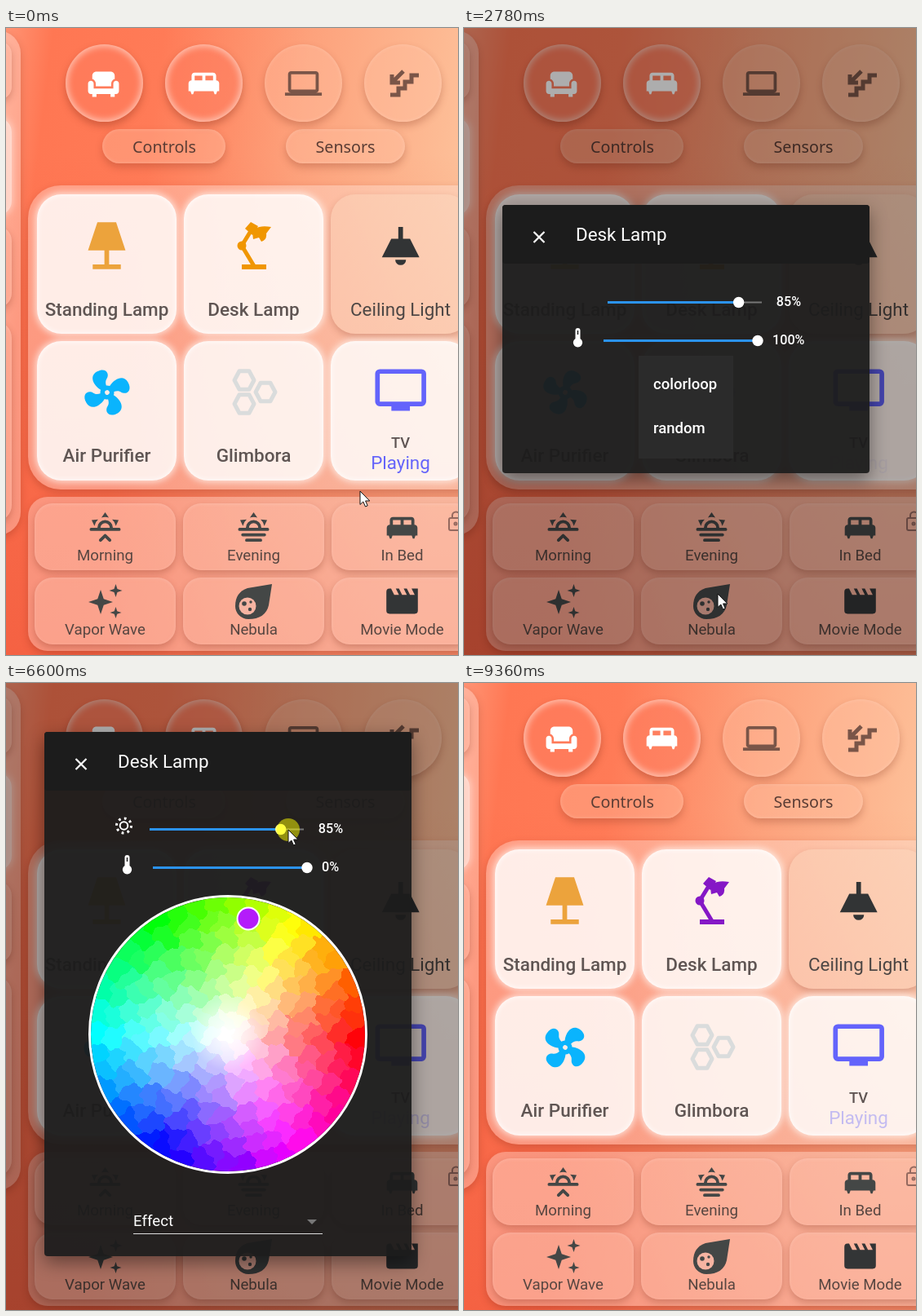
Write an HTML page with a canvas that moves like this. It is 554 px wide and 769 px high and loops after 9410 ms.

```html
<!DOCTYPE html>
<html lang="en">
<head>
<meta charset="utf-8">
<title>Light control dashboard</title>
<style>
html, body { margin: 0; width: 100%; height: 100%; overflow: hidden; }
#stage { position: relative; width: 554px; height: 769px; overflow: hidden;
  background: linear-gradient(transparent 20%, rgba(232,70,45,.45)),
    linear-gradient(97deg, #ff9474 0, #ff7753 9%, #ff7b57 30%, #fda27c 58%, #fdc29b 92%); }
#stage div, #stage svg, #stage canvas { position: absolute; box-sizing: border-box; }
.full { left: 0; top: 0; width: 554px; height: 769px; }
svg { overflow: visible; }
text { font-family: Roboto, sans-serif; }
.panel { background: rgba(255,235,228,.34); box-shadow: 0 4px 10px rgba(130,40,20,.28); }
.on { background: rgba(255,252,250,.85); box-shadow: 0 0 9px 2px rgba(255,248,244,.75), inset 0 0 7px #fff; }
.off { background: rgba(250,215,190,.4); box-shadow: 0 4px 8px rgba(130,50,30,.25); }
.scene { background: rgba(255,190,170,.35); box-shadow: 0 4px 8px rgba(130,50,30,.3), inset 0 1px 4px rgba(255,225,215,.25); }
.lit { background: rgba(255,125,95,.6); box-shadow: 0 5px 10px rgba(130,40,20,.35), inset 0 0 9px 2px rgba(255,225,215,.75); }
.dim { background: rgba(255,195,165,.35); box-shadow: 0 5px 10px rgba(130,50,30,.28), inset 0 0 5px rgba(255,230,215,.3); }
#scrim { background: rgba(0,0,0,.32); }
#popup, #dialog { transform-origin: 272px 381px; }
#wheel, #mini { border-radius: 50%; }
#wheel { left: 101px; top: 260px; width: 342px; height: 342px; border: 3px solid #fff; }
#mini { left: 280px; top: 637px; width: 72px; height: 72px; }
#cross { mix-blend-mode: difference; }
</style>
</head>
<body>
<div id="stage"></div>
<script>
const stage = document.getElementById('stage');
const $ = id => document.getElementById(id);

const box = (cls, x, y, w, h, r, css = '') =>
  `<div class="${cls}" style="left:${x}px;top:${y}px;width:${w}px;height:${h}px;border-radius:${r}px;${css}"></div>`;
const svg = (body, attrs = '') => `<svg class="full" viewBox="0 0 554 769" ${attrs}>${body}</svg>`;
const text = (x, y, s, size, fill, weight = 400, more = 'text-anchor="middle"') =>
  `<text x="${x}" y="${y}" font-size="${size}" fill="${fill}" font-weight="${weight}" ${more}>${s}</text>`;
// Icons live on a 24-unit grid and are centred on (x, y).
const icon = (x, y, k, fill, d, id = '') =>
  `<g transform="translate(${x} ${y}) scale(${k})"><g id="${id}"><path transform="translate(-12 -12)" fill="${fill}" fill-rule="evenodd" d="${d}"/></g></g>`;

const SUN = 'M3 12H7A5 5 0 0 1 17 12H21A1 1 0 0 1 21 14H3A1 1 0 0 1 3 12M15 12A3 3 0 0 0 9 12ZM12 2L14.4 5.4Q12 4.6 9.6 5.4ZM3.3 7L7.5 6.6Q5.6 8.2 5.1 10.8ZM20.7 7L18.9 10.8Q18.4 8.2 16.5 6.6Z';
const D = {
  bed: 'M20 10V7c0-1.1-.9-2-2-2H6C4.9 5 4 5.9 4 7v3c-1.1 0-2 .9-2 2v5h1.3L4 19h1l.7-2h12.6l.7 2h1l.7-2H22v-5c0-1.1-.9-2-2-2zm-9 0H6V7h5zm7 0h-5V7h5z',
  chair: 'M21 9.5c-1.1 0-2 .9-2 2V15H5v-3.500c0-1.100-.9-2-2-2s-2 .9-2 2V17c0 1.100.9 2 2 2h1v2h3v-2h10v2h3v-2h1c1.100 0 2-.9 2-2v-5.500c0-1.100-.9-2-2-2zM17 3H7C5.300 3 4 4.300 4 6v2.200c1.500.5 2.500 1.700 2.500 3.300V13.500h11v-2c0-1.600 1-2.800 2.500-3.300V6c0-1.700-1.300-3-3-3z',
  laptop: 'M4 6H20V16H4M20 18A2 2 0 0 0 22 16V6C22 4.900 21.100 4 20 4H4C2.900 4 2 4.900 2 6V16A2 2 0 0 0 4 18H0V20H24V18Z',
  lamp: 'M8 2H16L20 14H4ZM11 14H13V20H18V22H6V20H11Z',
  ceiling: 'M8 9H11V4H13V9H16L20 17H4ZM14.300 18A2.300 2.300 0 0 1 9.700 18Z',
  tv: 'M21 17H3V5H21M21 3H3A2 2 0 0 0 1 5V17A2 2 0 0 0 3 19H8V21H16V19H21A2 2 0 0 0 23 17V5A2 2 0 0 0 21 3Z',
  fan: 'M12 11A1 1 0 0 0 12 13A1 1 0 0 0 12 11M12.500 2C17 2 17.110 5.570 14.750 6.750C13.760 7.240 13.320 8.290 13.130 9.220C13.610 9.420 14.030 9.730 14.350 10.130C18.050 8.130 22.030 8.920 22.030 12.500C22.030 17 18.460 17.100 17.280 14.730C16.780 13.740 15.720 13.300 14.790 13.110C14.590 13.590 14.280 14 13.880 14.340C15.870 18.030 15.080 22 11.500 22C7 22 6.910 18.420 9.270 17.240C10.250 16.750 10.690 15.710 10.890 14.790C10.400 14.590 9.970 14.270 9.650 13.870C5.960 15.850 2 15.070 2 11.500C2 7 5.560 6.890 6.740 9.260C7.240 10.250 8.290 10.680 9.220 10.870C9.410 10.390 9.730 9.970 10.140 9.650C8.150 5.960 8.940 2 12.500 2Z',
  morning: SUN + 'M12.700 16.300L15.800 19.400A1 1 0 0 1 14.400 20.800L12 18.400L9.600 20.800A1 1 0 0 1 8.200 19.400L11.300 16.300Q12 15.700 12.700 16.300Z',
  evening: SUN + 'M5 15.500H19A1 1 0 0 1 19 17.500H5A1 1 0 0 1 5 15.500M7.500 19H16.500A1 1 0 0 1 16.500 21H7.500A1 1 0 0 1 7.500 19Z',
  movie: 'M18 4L20 8H17L15 4H13L15 8H12L10 4H8L10 8H7L5 4H4A2 2 0 0 0 2 6V18A2 2 0 0 0 4 20H20A2 2 0 0 0 22 18V4Z'
};
const hex = (x, y) => {
  const p = [0, 1, 2, 3, 4, 5].map(i => [x + 12 * Math.cos(i * Math.PI / 3), y + 13 * Math.sin(i * Math.PI / 3)]);
  return `<polygon points="${p}" fill="none" stroke="#dadcdc" stroke-width="5" stroke-linejoin="round"/>`;
};
const star = (x, y, r) => {
  const q = r * .25;
  return `<path fill="#444746" d="M${x} ${y - r}l${q} ${r - q} ${r - q} ${q} ${q - r} ${q} ${-q} ${r - q} ${-q} ${q - r} ${q - r} ${-q} ${r - q} ${-q}z"/>`;
};

const cols = [0, 1, 2];
const boxes =
  box('panel', -60, 3, 78, 619, 28) +
  box('scene', -60, 16, 67, 72, 16) + box('on', -60, 110, 67, 120, 18, 'opacity:.6') +
  box('scene', -60, 243, 67, 100, 18) + box('scene', -60, 360, 67, 245, 20) +
  [0, 1, 2, 3].map(i => box(i < 2 ? 'lit' : 'dim', 72.5 + i * 122.3, 20, 95, 95, 48)).join('') +
  box('dim', 118, 124, 151, 42, 21) + box('dim', 343, 124, 146, 42, 21) +
  box('panel', 27, 193, 600, 373, 40) + box('panel', 27, 575, 600, 189, 24) +
  [204, 384].map(y => cols.map(i => box(y < 300 && i > 1 ? 'off' : 'on', 38 + i * 180, y, 171, 171, 30)).join('')).join('') +
  [583, 674].map(y => cols.map(i => box('scene', 35 + i * 182, y, 173, 82, 22)).join('')).join('');

const INK = '#5f5553', DARK = '#444746', NOTO = 'text-anchor="middle" style="font-family:\'Noto Sans\',sans-serif"';
const home = svg(
  icon(119.500, 69, 1.720, '#fff', D.chair) + icon(242.500, 68, 1.880, '#fff', D.bed) +
  icon(364.500, 68, 1.880, '#7a5548', D.laptop) +
  `<path d="M471 82H481V74H489V66H497V58H506M487 53L474 66M473 57V67H483" fill="none" stroke="#7a5548" stroke-width="5"/>` +
  text(194, 153, 'Controls', 19.700, '#5a3d35', 400, NOTO) + text(416, 153, 'Sensors', 19.700, '#5a3d35', 400, NOTO) +
  icon(123.500, 267, 2.870, '#eca33c', D.lamp) + icon(483.700, 267, 2.870, '#323435', D.ceiling) +
  `<g id="desk"><path d="M289 290H319V296H289ZM293 246L300 238L309 243L302 254ZM303 259Q299 240 325 244L319 252Q320 260 313 262L310 257Z"/>
   <circle cx="289" cy="267" r="5.500"/><path d="M300 249L289 267L304 292" fill="none" stroke="currentColor" stroke-width="5"/></g>` +
  icon(124, 447, 2.840, '#0ab4fd', D.fan, 'fan') + hex(292, 432) + hex(318, 446.500) + hex(292, 461) +
  icon(483.700, 444, 2.840, '#6363fb', D.tv) +
  text(123.500, 353, 'Standing Lamp', 22.500, INK, 500) + text(303.500, 353, 'Desk Lamp', 22.500, INK, 500) +
  text(483.500, 353, 'Ceiling Light', 22.400, '#4c4644') +
  text(123.500, 532, 'Air Purifier', 22.500, INK, 500) + text(303.500, 532, 'Glimbora', 22.500, INK, 500) +
  text(483.500, 515, 'TV', 18.300, INK, 500) + text(483.500, 541, 'Playing', 22.400, '#6363fb', 400, 'text-anchor="middle" id="playing"') +
  icon(121.500, 613, 1.900, DARK, D.morning) + icon(303.500, 613, 1.900, DARK, D.evening) + icon(485.500, 613, 1.880, DARK, D.bed) +
  star(116, 704, 15) + star(134.500, 690, 8) + star(134.500, 717, 7) +
  `<path fill="${DARK}" d="M326 682L322 708Q318 725 297 725A16 16 0 0 1 281 709Q281 692 296 687Z"/><circle cx="296" cy="709" r="10.500" fill="#f6b4a2"/>
   <g fill="${DARK}"><circle cx="292" cy="706" r="2.800"/><circle cx="300" cy="704" r="1.700"/><circle cx="299" cy="713" r="2.200"/></g>` +
  icon(485.500, 703, 1.930, '#333536', D.movie) +
  ['Morning', 'Evening', 'In Bed', 'Vapor Wave', 'Nebula', 'Movie Mode'].map((s, i) =>
    text(121.500 + i % 3 * 182, i < 3 ? 653 : 744, s, 18.700, '#574641')).join('') +
  `<g fill="none" stroke="#94695f" stroke-width="2"><rect x="543" y="601" width="16" height="15" rx="2"/><path d="M547 601V598a4.500 4.500 0 0 1 9 0"/><circle cx="551" cy="608" r="1.500"/></g>`);

const popup = `<div id="popup" class="full">` + box('', 61, 19, 422, 725, 4, 'background:rgba(28,28,28,.93)') +
  svg(text(272, 101, '85%', 21.600, '#fff') +
    `<path d="M204 132H341V496a19 19 0 0 1-19 19H223a19 19 0 0 1-19-19Z" fill="#000" opacity=".08"/>
     <path d="M204 190H341V496a19 19 0 0 1-19 19H223a19 19 0 0 1-19-19Z" fill="#f9dc64"/>
     <rect x="251" y="200" width="43" height="6" rx="2" fill="#fff" opacity=".8"/>
     <circle cx="228" cy="585" r="36" fill="#efe6e6"/><circle cx="316" cy="585" r="36" fill="#ebbd92"/><circle cx="228" cy="673" r="36" fill="#e6a05c"/>`) +
  `<canvas id="mini" width="72" height="72"></canvas></div>`;

const WHITE = '#fff', START = '';
const slider = (x, y, id) =>
  `<path d="M${x} ${y}h189" stroke="#777" stroke-width="2"/><path id="${id}Line" d="M${x} ${y}h189" stroke="#2b93f0" stroke-width="2.800"/><circle id="${id}Knob" cx="${x + 189}" cy="${y}" r="6.700" fill="#fff"/>`;
const dialog = `<div id="dialog" class="full"><div id="sheet" style="left:47px;top:60px;width:450px;border-radius:4px;background:rgba(28,28,28,.94);box-shadow:0 8px 22px rgba(0,0,0,.42)"></div>` +
  box('', 47, 60, 450, 72, 4, 'background:#1c1c1c') +
  `<canvas id="wheel" width="336" height="336"></canvas>` +
  svg(`<circle id="hover" cx="92" cy="96" r="27" fill="#fff" opacity=".07"/><path d="M85.500 93l13 13m0-13l-13 13" stroke="#fff" stroke-width="2.200"/>` +
    text(137, 104, 'Desk Lamp', 22.400, WHITE, 400, START) +
    `<g id="sun" fill="none" stroke="#fff"><circle cx="144.500" cy="175" r="4.800" stroke-width="2"/><circle cx="144.500" cy="175" r="9" stroke-width="3" stroke-dasharray="2.800 4.270"/></g>` +
    slider(176, 179.500, 'bri') + text(398, 184, '', 16.200, WHITE, 500, 'text-anchor="middle" id="briText"') +
    `<g id="temp"><path d="M136.500 224V214a3 3 0 0 1 6 0V224a5.700 5.700 0 1 1-6 0Z" fill="#fff"/><path d="M139.500 214v5" stroke="#1c1c1c" stroke-width="1.500"/>` +
    slider(171, 226.500, 'temp') + text(378, 231, '', 16.200, WHITE, 500, 'id="tempText"') + `</g>` +
    `<g id="full"><circle id="mark" stroke-width="2"/>` + text(156, 666, 'Effect', 18.700, WHITE, 400, START) +
    `<path d="M156 675.500H388" stroke="#ddd"/><path d="M369 658h12l-6 6z" fill="#777"/></g>
     <g id="menu"><rect x="214" y="245" width="116" height="126" fill="#2b2b2b"/>` +
    text(232, 286, 'colorloop', 18.500, WHITE, 500, START) + text(232, 340, 'random', 18.500, WHITE, 500, START) + `</g>`) + `</div>`;

const pointer =
  svg(`<circle r="14" id="press" fill="#ff0" opacity=".5"/>`) +
  svg(`<path id="crossPath" d="M-12 0H12M0-12V12" stroke="#fff" stroke-width="2"/>`, 'id="cross"') +
  svg(`<path id="arrow" d="M0 0V16.500L3.800 13L6.500 19L9.200 17.800L6.600 12H11.800Z" fill="#fff" stroke="#111"/>
    <path id="hand" d="M-2-5q0-2 2-2t2 2V2l6 1.500q2 .5 2 3L9 15H0L-6 7q-1-2 1-2.500L-2 7Z" fill="#fff" stroke="#111"/>`);

stage.innerHTML = boxes + home + '<div id="scrim" class="full"></div>' + popup + dialog + pointer;

// Colour wheel: jittered ring cells with wavy borders.
function drawWheel() {
  const n = 336, c = n / 2, ctx = $('wheel').getContext('2d'), img = ctx.createImageData(n, n);
  let seed = 7;
  const rnd = () => (seed = seed * 16807 % 2147483647) / 2147483647 - .5;
  const cells = [{ x: 0, y: 0, rgb: [255, 255, 255] }];
  for (let k = 1; k <= 8; k++) {
    const count = Math.round(4 + 4.500 * k);
    for (let i = 0; i < count; i++) {
      const a = (i + k * .4 + rnd() * .7) / count * 2 * Math.PI, r = k * 20 + rnd() * 12;
      const s = Math.min(1, r / 162);
      const rgb = [0, 8, 4].map(o => {
        const h = (o + a * 6 / Math.PI) % 12;
        const pure = Math.max(0, Math.min(1, .5 - Math.max(-1, Math.min(h - 3, 9 - h, 1)) ));
        return 255 * (1 - s + s * Math.min(1, pure * 1));
      });
      // Full-saturation hue as a clipped triangle wave.
      const h6 = a * 3 / Math.PI;
      [0, 4, 2].forEach((o, j) => {
        const d = Math.abs(((h6 - o) % 6 + 9) % 6 - 3);
        rgb[j] = 255 * (1 - s + s * Math.max(0, Math.min(1, 2 - d)));
      });
      cells.push({ x: r * Math.cos(a), y: r * Math.sin(a), rgb });
    }
  }
  for (let y = 0; y < n; y++) for (let x = 0; x < n; x++) {
    const px = x - c + 3 * Math.sin(y * .19) + 1.500 * Math.sin(y * .5 + x * .1);
    const py = y - c + 3 * Math.sin(x * .17) + 1.500 * Math.sin(x * .46 - y * .1);
    let best = 1e9, hit;
    for (const s of cells) {
      const d = (s.x - px) ** 2 + (s.y - py) ** 2;
      if (d < best) { best = d; hit = s; }
    }
    img.data.set([...hit.rgb, 255], (y * n + x) * 4);
  }
  ctx.putImageData(img, 0, 0);
  const glow = ctx.createRadialGradient(c, c, 0, c, c, 45);
  glow.addColorStop(0, '#fff');
  glow.addColorStop(1, 'rgba(255,255,255,0)');
  ctx.fillStyle = glow;
  ctx.fillRect(0, 0, n, n);
  $('mini').getContext('2d').drawImage($('wheel'), 0, 0, 72, 72);
}
drawWheel();

const LOOP = 9410;
const path = [[0, 434, 568], [850, 303, 300], [1000, 302, 299], [1850, 302, 299], [2450, 311, 694], [3300, 311, 694],
  [3650, 312, 460], [4020, 327, 322], [4400, 322, 240], [4800, 211, 385], [5200, 297, 289], [5700, 297, 289],
  [6450, 346, 180], [6640, 346, 180], [7100, 287, 181], [7250, 287, 181], [7810, 90, 92], [8150, 90, 92],
  [8700, 138, 190], [9250, 532, 775], [LOOP, 532, 775]];
const presses = [[1000, 1560], [2500, 2600], [5200, 5320], [6560, 7150], [7880, 7960]];
const ramp = (t, a, b) => Math.max(0, Math.min(1, (t - a) / (b - a)));
const ease = u => u * u * (3 - 2 * u);
const show = (id, on) => $(id).style.display = on ? '' : 'none';
const set = (id, attrs) => { for (const k in attrs) $(id).setAttribute(k, attrs[k]); };

function cursorAt(t) {
  const i = path.findIndex(p => p[0] > t), [t0, x0, y0] = path[i - 1], [t1, x1, y1] = path[i];
  const u = ease((t - t0) / (t1 - t0));
  return [x0 + (x1 - x0) * u, y0 + (y1 - y0) * u];
}

function draw(t) {
  const [x, y] = cursorAt(t);
  const picked = t >= 5250, wide = t >= 2960;
  const pop = ramp(t, 1555, 1705) * (1 - ramp(t, 2570, 2640));
  const dlg = ramp(t, 2620, 2750) * (1 - ramp(t, 7960, 8080));

  $('fan').setAttribute('transform', `rotate(${35 + (t - 9360) * .18})`);
  $('playing').style.opacity = .5 + .5 * Math.cos((t / 2000 - .97) * 2 * Math.PI);
  const lamp = picked ? '#8518c6' : '#f09600';
  $('desk').style.cssText = `fill:${lamp};color:${lamp}`;

  $('scrim').style.opacity = t < 2640 ? ramp(t, 1555, 1755) : t < 7960 ? 1 : dlg;
  show('popup', pop > 0);
  $('popup').style.opacity = pop;
  $('popup').style.transform = `scale(${t < 2500 ? .853 + .213 * pop : 1.066})`;

  show('dialog', dlg > 0);
  $('dialog').style.opacity = dlg;
  $('dialog').style.transform = `translateY(${wide ? 0 : 157}px) scale(${t < 3000 ? .85 + .15 * dlg : 1})`;
  $('sheet').style.height = (wide ? 643 : 329) + 'px';
  for (const id of ['wheel', 'full', 'sun']) show(id, wide);
  show('menu', !wide);

  const level = t < 6640 ? 85 : Math.max(54, 85 - 31 * ease(ramp(t, 6640, 7100)));
  const knob = 176 + 1.890 * level;
  set('briLine', { d: `M176 179.500H${knob}` });
  set('briKnob', { cx: knob, fill: t > 6560 && t < 7150 ? '#ffff80' : '#fff' });
  $('briText').textContent = t < 7150 ? '85%' : '54%';
  set('temp', { transform: `translate(${picked ? 9 : 0} 0)` });
  $('tempText').textContent = picked ? '0%' : '100%';
  set('mark', picked ? { cx: 297, cy: 289, r: 13.500, fill: '#b41cfa', stroke: '#fff' }
    : { cx: 272, cy: 431, r: 15, fill: '#fff', stroke: '#ccc' });

  const open = wide && dlg > .5;
  const cross = open && Math.hypot(x - 272, y - 431) < 170;
  const hand = open && Math.hypot(x - 92, y - 96) < 27;
  show('hover', hand);
  show('hand', hand);
  show('cross', cross);
  show('arrow', !cross && !hand);
  show('press', presses.some(([a, b]) => t >= a && t < b));
  const at = { transform: `translate(${x} ${y})` };
  for (const id of ['hand', 'arrow', 'crossPath', 'press']) set(id, at);
}

const begin = performance.now();
function tick() {
  draw((performance.now() - begin) % LOOP);
  requestAnimationFrame(tick);
}
tick();
</script>
</body>
</html>
```
